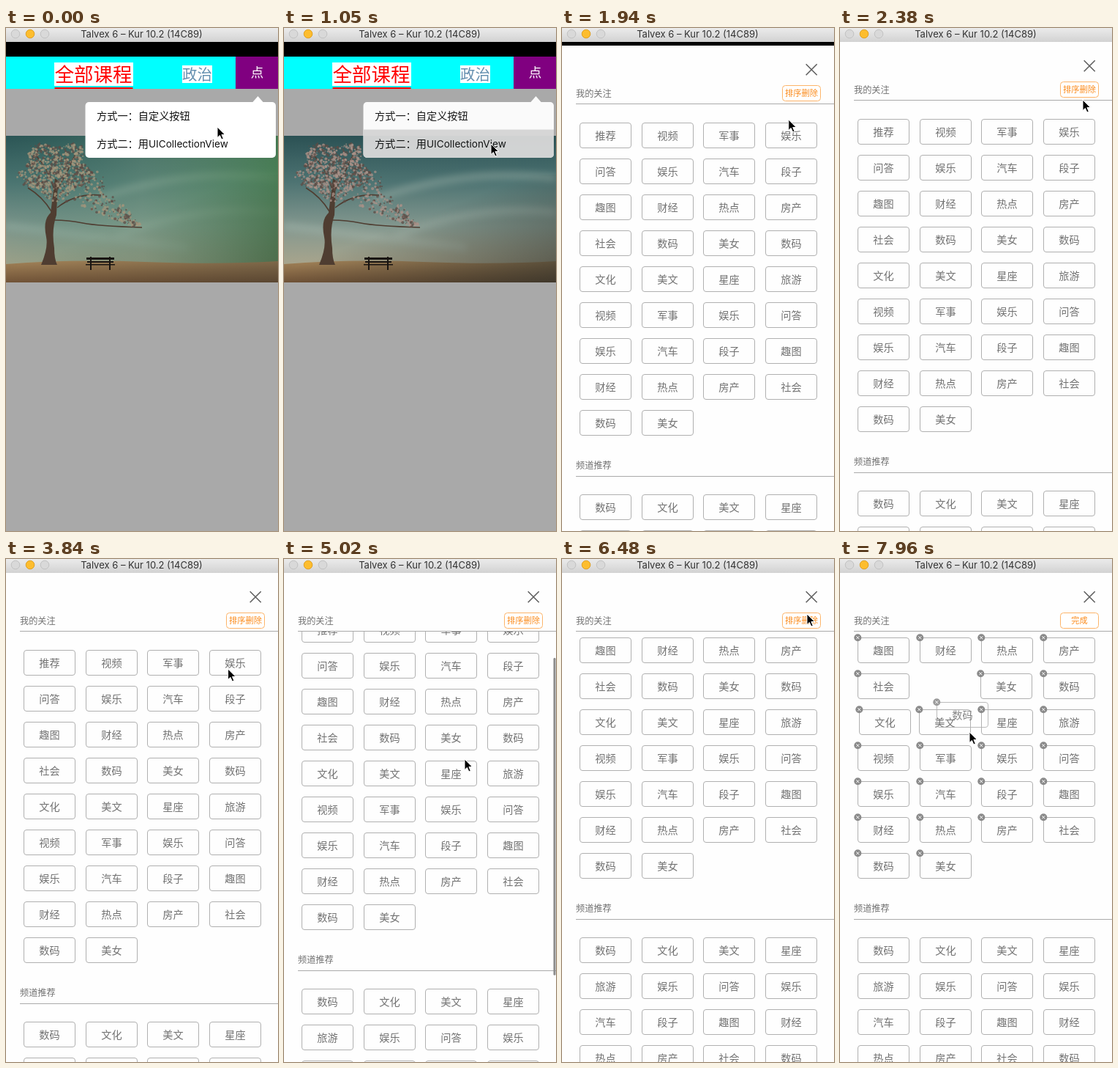
Recreate the animation shown at these times as an HTML page. Size 372 by 686 pixels, loop 8000 ms.

```html
<!DOCTYPE html>
<html lang="zh-CN">
<head>
<meta charset="utf-8">
<title>Channel picker</title>
<style>
  html, body { margin: 0; width: 100%; height: 100%; overflow: hidden; }
  svg { display: block; width: 372px; height: 686px; }
  text { font-family: Inter, "Noto Sans CJK SC", "Noto Sans CJK", sans-serif; }
</style>
</head>
<body>
<svg id="stage" viewBox="0 0 372 686">
  <defs>
    <linearGradient id="bar" x2="0" y2="1">
      <stop stop-color="#ebebeb"/><stop offset="1" stop-color="#d2d2d2"/>
    </linearGradient>
    <linearGradient id="sky" x2="0" y2="1">
      <stop stop-color="#2b5154"/><stop offset=".35" stop-color="#4d7372"/>
      <stop offset=".7" stop-color="#84988f"/><stop offset="1" stop-color="#aaa58c"/>
    </linearGradient>
    <linearGradient id="ground" x2="0" y2="1">
      <stop stop-color="#a08157"/><stop offset="1" stop-color="#745538"/>
    </linearGradient>
    <linearGradient id="shade" y2="1">
      <stop offset=".45" stop-color="#2a2c26" stop-opacity="0"/>
      <stop offset="1" stop-color="#2a2c26" stop-opacity=".7"/>
    </linearGradient>
    <linearGradient id="green">
      <stop stop-color="#2f7a62" stop-opacity=".1"/>
      <stop offset=".5" stop-color="#6d9a7c" stop-opacity=".4"/>
      <stop offset="1" stop-color="#4a8250" stop-opacity=".8"/>
    </linearGradient>
    <linearGradient id="purple">
      <stop stop-color="#1c2f62" stop-opacity=".75"/>
      <stop offset=".45" stop-color="#40256f" stop-opacity=".8"/>
      <stop offset="1" stop-color="#6a0b9c" stop-opacity=".92"/>
    </linearGradient>
    <filter id="soft" x="-20%" y="-100%" width="140%" height="300%"><feGaussianBlur stdDeviation="5"/></filter>
    <clipPath id="photoClip"><path d="M0 147H372V347H0z"/></clipPath>
    <clipPath id="listClip"><path d="M0 99H372V686H0z"/></clipPath>
  </defs>

  <path d="M0 0H372V686H0z" fill="#a9a9a9"/>
  <path d="M0 19H372V39H0z"/>
  <path d="M0 39H314V83H0z" fill="#0ff"/>
  <path d="M314 39H372V83H314z" fill="#800080"/>
  <path d="M66 47H174V79H66zM241 51H282V75H241z" fill="#fff"/>
  <path d="M66.500 81H173.500V83H66.500z" fill="red"/>
  <g id="tabs"></g>

  <g clip-path="url(#photoClip)">
    <path d="M0 147H372V325H0z" fill="url(#sky)"/>
    <g filter="url(#soft)" fill="none" stroke="#a9bab0" stroke-width="10" opacity=".4">
      <path d="M120 235Q240 190 372 205M150 285Q260 240 372 252M0 270Q120 285 250 300"/>
    </g>
    <path id="tint" d="M0 147H372V325H0z"/>
    <path d="M0 322Q90 315 190 319T372 318V347H0z" fill="url(#ground)"/>
    <path d="M0 200H372V347H0z" fill="url(#shade)" id="vignette"/>
    <path d="M48 323Q58 300 55 285Q50 262 61 252L67 205L71 208L69 255Q62 275 66 300Q66 315 70 323z" fill="#4f3d31"/>
    <path d="M66 262Q85 262 105 266T186 272M62 250Q50 230 30 218M67 225Q60 195 42 175M69 222Q85 195 95 172M70 245Q95 225 130 228" fill="none" stroke="#4f3d31" stroke-width="1.600"/>
    <g id="leaves"></g>
    <path d="M110 313H148V316H110zM111 318H147V320H111zM109 322H149V323.500H109zM115 312H117V330H115zM141 312H143V330H141z" fill="#191512"/>
  </g>

  <g id="popup">
    <rect x="108.500" y="101" width="260.500" height="76" rx="5" fill="#fff"/>
    <path d="M337 101.500L344.500 93L352 101.500z" fill="#fff"/>
    <path id="pressed" d="M108.500 138.500H369V172a5 5 0 0 1-5 5H113.500a5 5 0 0 1-5-5z" fill="#d9d9d9"/>
  </g>

  <g id="sheet">
    <path d="M0 19H372V700H0z" fill="#fefefe"/>
    <path d="M333.700 44.200L348.700 59.200M348.700 44.200L333.700 59.200" stroke="#606060" stroke-width="1.600"/>
    <rect x="301.500" y="73.500" width="52" height="21" rx="4" fill="#fff" stroke="#fdb469"/>
    <path d="M19 98.500H372" stroke="#aaa"/>
    <g clip-path="url(#listClip)">
      <g id="list"><path d="M19 606.500H372" stroke="#aaa"/></g>
      <rect id="thumb" x="368.500" width="3" height="433" rx="1.500" fill="#8c8c8c"/>
    </g>
  </g>

  <path d="M0 0H372V19H0z" fill="url(#bar)"/>
  <g id="title"></g>
  <path id="cursor" d="M0 0V14.500L3.400 11.400L5.900 17L8.300 16L5.900 10.500H10.500z" stroke="#fff"/>
</svg>
<script>
const LOOP = 8000, STEP = 147.4;
const byId = id => document.getElementById(id);

function add(parent, tag, attrs, content) {
  const el = document.createElementNS("http://www.w3.org/2000/svg", tag);
  for (const key in attrs) el.setAttribute(key, attrs[key]);
  if (content) el.textContent = content;
  parent.append(el);
  return el;
}

// Text placed by the middle of its line
function label(parent, x, y, size, fill, content, anchor = "middle") {
  return add(parent, "text", {
    x, y: y + size * 0.37, fill, "font-size": size, "text-anchor": anchor
  }, content);
}

const ramp = (k, from, to) => Math.min(1, Math.max(0, (k - from) / (to - from)));
const smooth = p => p * p * (3 - 2 * p);
const move = (el, x, y) => el.setAttribute("transform", `translate(${x} ${y})`);
const fade = (el, amount) => el.setAttribute("opacity", Number(amount));

// Window and tab bar
const title = byId("title"), tabs = byId("tabs");
["#d9d9d9", "#fdbd2e", "#d9d9d9"].forEach((fill, i) => add(title, "circle", {
  cx: 13 + 20 * i, cy: 8, r: 5.8, fill, stroke: i === 1 ? "#dfa023" : "#c2c2c2"
}));
label(title, 185.5, 8.5, 13, "#333", "Talvex 6 – Kur 10.2 (14C89)");
label(tabs, 119.5, 63, 26.4, "red", "全部课程");
label(tabs, 261.5, 63, 20.4, "#6590b0", "政治");
label(tabs, 343.5, 61, 17.5, "#fff", "点");

// Foliage: a round crown and a thinning sweep along the right branch
const leaves = byId("leaves");
let seed = 7;
const random = () => (seed = seed * 16807 % 2147483647) / 2147483647;
for (let i = 0; i < 1100; i++) {
  const angle = random() * 2 * Math.PI, reach = Math.sqrt(random());
  const along = i % 4 ? 0 : random();
  const size = (1 - along) * (0.85 + 0.15 * Math.sin(5 * angle));
  add(leaves, "circle", {
    cx: (68 + 112 * along + (50 * size + 5) * reach * Math.cos(angle)).toFixed(1),
    cy: (194 + 76 * along + (40 * size + 3) * reach * Math.sin(angle)).toFixed(1),
    r: (0.7 + random() * 1.4).toFixed(1),
    fill: random() < 0.6 ? "currentColor" : "#5d4c45",
    opacity: 0.75
  });
}

// Popup menu
const popup = byId("popup");
label(popup, 124, 120, 14.2, "#111", "方式一：自定义按钮", "start");
const second = label(popup, 124, 158, 14.2, "#111", "方式二：用", "start");
add(second, "tspan", { "font-size": 13.6 }, "UICollectionView");

// Channel sheet
const GREY = "#727272";
const sheet = byId("sheet"), list = byId("list"), thumb = byId("thumb");
label(sheet, 19, 84, 12.2, GREY, "我的关注", "start");
label(list, 19, 591, 12.2, GREY, "频道推荐", "start");
const action = label(sheet, 327.5, 84, 11.2, "#fb8c1e", "排序删除");

function cell(name, i, top, removable) {
  const x = Math.round(24.3 + 84.5 * (i % 4)), y = top + 49 * Math.floor(i / 4);
  const group = add(list, "g", {});
  add(group, "rect", {
    x: x + 0.5, y: y + 0.5, width: 70, height: 34, rx: 3.5, fill: "none", stroke: "#b0b0b0"
  });
  label(group, x + 35.5, y + 17.5, 14.2, GREY, name);
  let badge;
  if (removable) {
    badge = add(group, "g", {});
    move(badge, x + 0.3, y + 0.3);
    add(badge, "circle", { r: 5, fill: "#8a8a8a" });
    add(badge, "path", { d: "M-2-2L2 2M2-2L-2 2", stroke: "#fff" });
  }
  return { group, badge };
}

// The channel names repeat in one cycle
const cycle = "文化 美文 星座 旅游 视频 军事 娱乐 问答 娱乐 汽车 段子 趣图 财经 热点 房产 社会 数码 美女".split(" ");
const opening = "推荐 视频 军事 娱乐 问答 娱乐 汽车 段子 趣图 财经 热点 房产 社会 数码 美女 数码".split(" ");
const more = ["数码", ...cycle.slice(0, 4), "娱乐", ...cycle.slice(7, 17)];
const cells = [...opening, ...cycle].map((name, i) => cell(name, i, 124, true));
more.forEach((name, i) => cell(name, i, 631, false));
const dragged = cells[13].group;
list.append(dragged);

// Pointer stops: step, x, y
const stops = [
  [0, 289, 135], [2, 283, 158], [8, 283, 158], [11, 295, 143], [16, 332, 98],
  [22, 258, 262], [27, 315, 122], [32, 252, 317], [34, 247, 273], [37, 238, 221],
  [43, 335, 75], [47, 335, 80], [51, 156, 183], [54, 177, 236]
];

function pointerAt(k) {
  const i = Math.max(1, stops.findIndex(stop => stop[0] >= k));
  const [from, x, y] = stops[i - 1], [to, nextX, nextY] = stops[i];
  const p = ramp(k, from, to);
  return [x + (nextX - x) * p, y + (nextY - y) * p];
}

function draw(k) {
  move(byId("cursor"), ...pointerAt(k));

  // Photo mood: green, plain, purple
  const early = k < 2, late = k >= 8;
  fade(byId("tint"), early || late);
  byId("tint").setAttribute("fill", early ? "url(#green)" : "url(#purple)");
  leaves.setAttribute("color", early ? "#a3957c" : late ? "#a06f9c" : "#a99288");
  fade(byId("vignette"), early ? 0.5 : 1);

  fade(popup, 1 - ramp(k, 6.9, 9));
  fade(byId("pressed"), k >= 7);

  move(sheet, 0, Math.round(667 * (1 - ramp(k, 10, 14)) ** 3.52));
  const scroll = Math.round(114.5 * smooth(ramp(k, 31, 38)));
  move(list, 0, -scroll);
  thumb.setAttribute("y", 102 + 0.73 * scroll);
  fade(thumb, ramp(k, 31, 32) - ramp(k, 39, 41));

  const editing = k >= 46;
  action.textContent = editing ? "完成" : "排序删除";
  cells.forEach(c => fade(c.badge, editing));

  const pull = ramp(k, 52, 54), shift = ramp(k, 53, 54);
  move(dragged, Math.round(23 * pull), Math.round(39 * pull));
  fade(dragged, k >= 52 ? 0.85 : 1);
  move(cells[16].group, 2 * shift, 0);
  for (const i of [14, 17]) move(cells[i].group, -shift, 0);
}

function frame() {
  draw(Math.floor(performance.now() % LOOP / STEP));
  requestAnimationFrame(frame);
}
frame();
</script>
</body>
</html>
```
